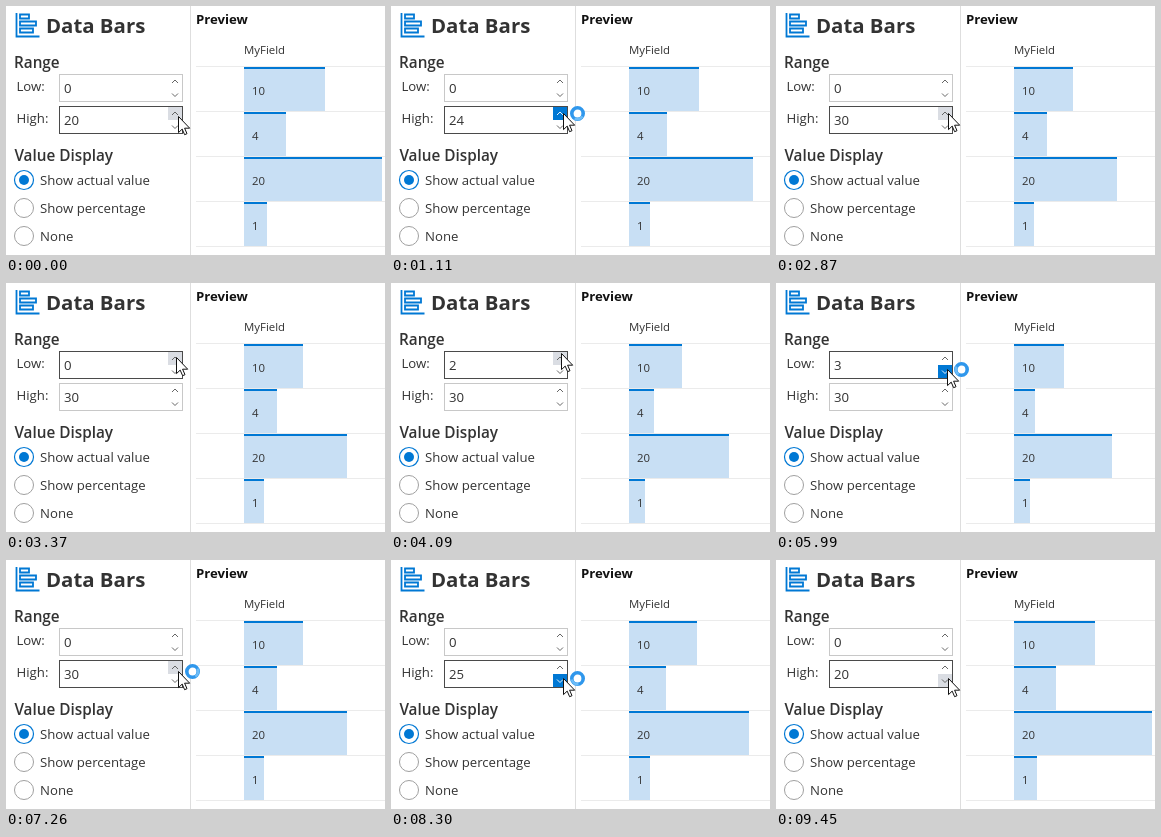
Recreate the animation shown at these times as an HTML page. Size 379 px wide and 249 px high, loop 9.63 s.

```html
<!DOCTYPE html>
<html lang="en">
<head>
<meta charset="utf-8">
<title>Data Bars</title>
<style>
  html, body { margin: 0; width: 100%; height: 100%; overflow: hidden; background: #fff; }
  svg { display: block; width: 379px; height: 249px; }
  text { font: 13.2px "Open Sans", "Noto Sans", sans-serif; fill: #333; }
  .title { font-size: 20.4px; font-weight: 700; }
  .head { font-size: 15.3px; font-weight: 600; }
  .preview { font-size: 13.2px; font-weight: 700; fill: #111; }
  .cell { font-size: 11.4px; }
  .line { stroke: #ebebeb; }
  .blue { fill: none; stroke: #0078d4; stroke-width: 1.8; }
  .radio { fill: #fff; stroke: #a0a0a0; }
  .radio.on { stroke: #0078d4; stroke-width: 1.2; }
  .box { fill: #fff; stroke: #c8c8c8; }
  .box.over { stroke: #4a4a4a; }
  .btn { fill: none; }
  .btn.hover { fill: #dadde3; }
  .btn.down { fill: #0078d4; }
  .chev { fill: none; stroke: #555; stroke-width: .9; }
  .down + .chev { stroke: #fff; }
  .fill { fill: #c8dff4; }
  .top { fill: #0078d4; }
</style>
</head>
<body>
<svg viewBox="0 0 379 249">
  <path class="line" style="stroke:#dedede" d="M184.5 0V249"/>
  <path class="blue" d="M10.5 7V30.5H33.5M14 8.5H23V12.5H14ZM14 15.5H30V19.5H14ZM14 22.5H27V26.5H14Z"/>
  <text class="title" x="40" y="27">Data Bars</text>
  <text class="head" x="8" y="62">Range</text>
  <text x="10.5" y="85">Low:</text>
  <text x="10.5" y="117">High:</text>
  <g id="fields"></g>
  <text class="head" x="8.4" y="155">Value Display</text>
  <g id="radios"></g>
  <text class="preview" x="190" y="18">Preview</text>
  <text class="cell" x="238" y="48">MyField</text>
  <g id="rows"></g>
  <g id="cursor">
    <path d="M.5 .5V16.6L4.2 13.1L6.6 18.7L9 17.7L6.6 12.2H11.7Z" fill="#fff" stroke="#111"/>
    <g id="busy" fill="none">
      <circle cx="14.5" cy=".5" r="5.7" fill="#fff" stroke="#2f97ec" stroke-width="3.6"/>
      <path id="glint" d="M14.5 -5.2A5.7 5.7 0 0 1 20.2 .5" stroke="#6cbcf7" stroke-width="2.4"/>
    </g>
  </g>
</svg>
<script>
const LOOP = 9630, DATA = [10, 4, 20, 1];
const $ = id => document.getElementById(id);

function add(parent, tag, attrs, text = '') {
  const el = document.createElementNS('http://www.w3.org/2000/svg', tag);
  for (const k in attrs) el.setAttribute(k, attrs[k]);
  el.textContent = text;
  return parent.appendChild(el);
}

const clamp = (v, lo, hi) => Math.max(lo, Math.min(hi, v));
const between = (t, a, b) => t >= a && t < b;

// Number of ticks so far: the first at start, the rest at even gaps
const ticks = (t, start, gap, n) => clamp(Math.floor((t - start) / gap) + 1, 0, n);

// True for a short while after each tick
const clicked = (t, start, gap, n) =>
  between(t, start, start + gap * n) && (t - start) % gap < 100;

// Eased progress from 0 to 1
function glide(t, a, b) {
  const p = clamp((t - a) / (b - a), 0, 1);
  return p * p * (3 - 2 * p);
}

['Show actual value', 'Show percentage', 'None'].forEach((label, i) => {
  const g = $('radios'), cy = 174 + 28 * i;
  add(g, 'circle', { class: i ? 'radio' : 'radio on', cx: 18, cy, r: 9.5 });
  if (!i) add(g, 'circle', { class: 'top', cx: 18, cy, r: 5 });
  add(g, 'text', { x: 34, y: cy + 5 }, label);
});

const fields = [68, 100].map(y => {
  const g = $('fields');
  const box = add(g, 'rect', { class: 'box', x: 53.5, y: y + .5, width: 123, height: 27 });
  const btns = [0, 1].map(i => {
    const btn = add(g, 'rect', { class: 'btn', x: 162, y: y + 1 + i * 13, width: 14, height: 13 });
    const s = i ? 3 : -3;
    add(g, 'path', { class: 'chev', d: `M166 ${y + 7.5 + i * 13.5 - s / 2}l3 ${s}l3 ${-s}` });
    return btn;
  });
  return { y, box, btns, text: add(g, 'text', { x: 58, y: y + 19 }) };
});

const bars = DATA.map((v, i) => {
  const g = $('rows'), y = 61 + 45 * i;
  add(g, 'path', { class: 'line', d: `M190 ${y - .5}H379m-189 45H379` });
  const parts = [['fill', 44], ['top', 2]].map(([c, height]) =>
    add(g, 'rect', { class: c, x: 238, y, height }));
  add(g, 'text', { class: 'cell', x: 246, y: y + 28 }, v);
  return parts;
});

function draw(t) {
  const up = [3570, 410, 4], down = [5960, 300, 4];
  const low = ticks(t, ...up) - ticks(t, ...down);
  const high = 20 + ticks(t, 380, 210, 4) + ticks(t, 1520, 95, 4) + ticks(t, 2200, 200, 2)
    - ticks(t, 7580, 1, 1) - ticks(t, 8030, 90, 5) - ticks(t, 8690, 210, 4);

  const held = between(t, 350, 2870) || between(t, 7540, 9450);
  const pressed = held || clicked(t, ...up) || clicked(t, ...down);
  const busy = pressed || between(t, 5960, 7310);

  // Up to the Low field, onto its lower button, then back to High
  const toLow = glide(t, 2870, 3500), toDown = glide(t, 5370, 5850);
  const toHigh = glide(t, 6960, 7250), toEnd = glide(t, 7310, 7500);
  const x = Math.round(172 - 2 * toLow + toDown + toHigh);
  const y = Math.round(110 - 3 * glide(t, 30, 70) - 37 * toLow + 16 * toDown + 25 * toHigh + 7 * toEnd);

  fields.forEach((f, i) => {
    const at = y - f.y;
    f.text.textContent = i ? high : low;
    f.box.classList.toggle('over', between(at, 0, 28));
    f.btns.forEach((b, j) => {
      const hit = between(at, 1 + 13 * j, 14 + 13 * j);
      b.setAttribute('class', hit ? 'btn ' + (pressed ? 'down' : 'hover') : 'btn');
    });
  });

  DATA.forEach((v, i) => {
    const part = Math.max(0, (v - low) / (high - low));
    const w = Math.min(138, Math.round(16 + 130 * part));
    bars[i].forEach(r => r.setAttribute('width', w));
  });

  $('cursor').setAttribute('transform', `translate(${x} ${y})`);
  $('busy').style.display = busy ? '' : 'none';
  $('glint').setAttribute('transform', `rotate(${(low + high) * 50} 14.5 .5)`);
}

const start = performance.now();
function tick() {
  draw((performance.now() - start) % LOOP);
  requestAnimationFrame(tick);
}
tick();
</script>
</body>
</html>
```
